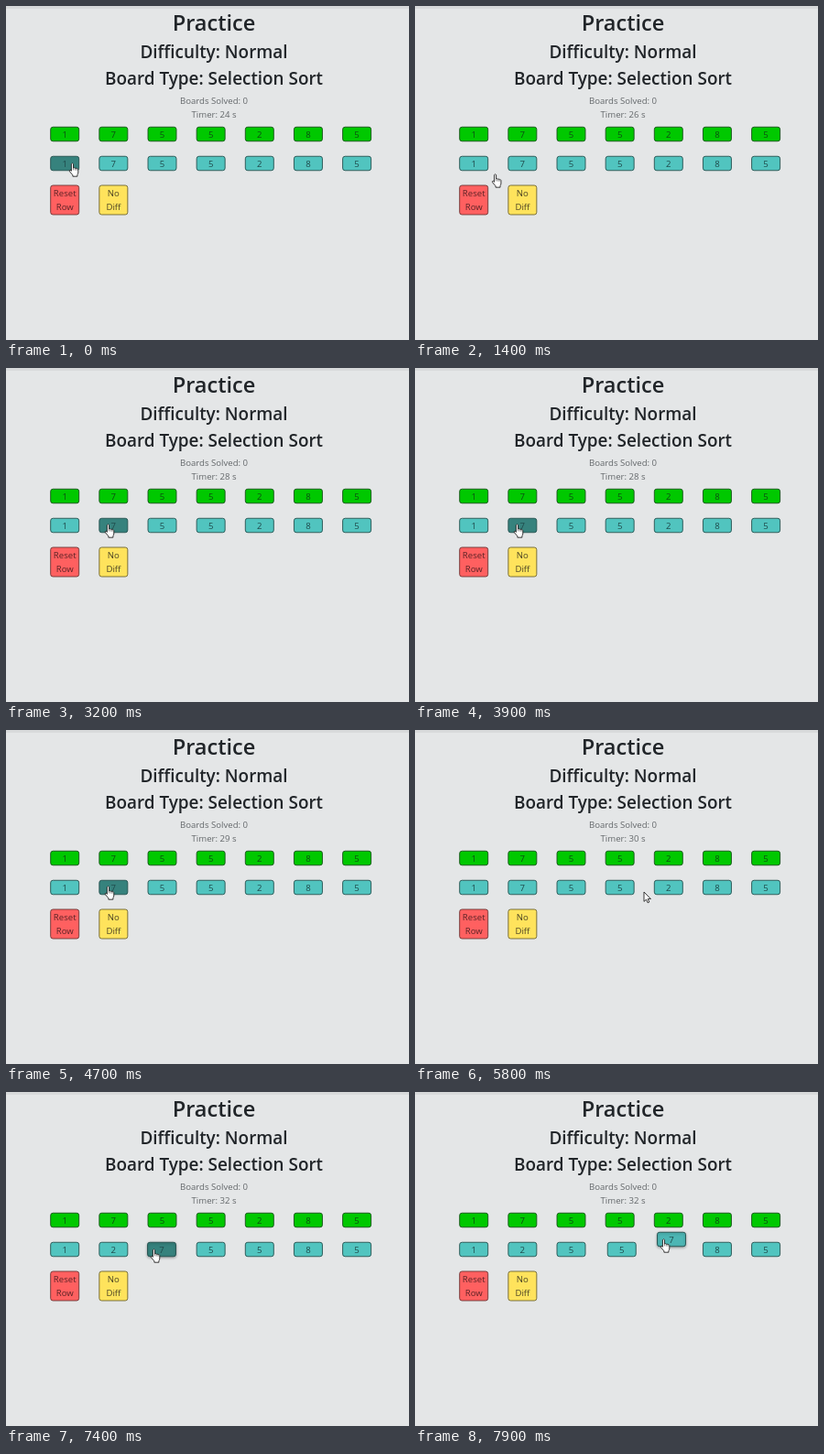
Recreate the animation shown at these times as an HTML page with a canvas. Size 440x365 px, loop 8000 ms.

```html
<!DOCTYPE html>
<html lang="en">
<head>
<meta charset="utf-8">
<title>Practice</title>
<style>
html, body { margin: 0; width: 100%; height: 100%; overflow: hidden; background: #e4e6e7; }
canvas { display: block; }
</style>
</head>
<body>
<canvas id="stage" width="440" height="365"></canvas>
<script>
const ctx = document.getElementById('stage').getContext('2d');
const LOOP = 8000, STEP = 100;
const TEAL = '#51c4bf', DARK = '#36827d';
const FONT = '"Open Sans", "Noto Sans", sans-serif';
const ROW_TOP = 140, ROW = 172;

const slot = i => 64.2 + i * 53.15;
const clamp = v => Math.max(0, Math.min(1, v));
const mix = (a, b, p) => a + (b - a) * p;
const smooth = p => p * p * (3 - 2 * p);
const easeOut = p => 1 - (1 - p) ** 3;
const ramp = (t, start, span) => easeOut(clamp((t - start) / span));

// [time, x, y] of the pointer's hot spot
const PATH = [
  [0, 72, 172], [1200, 72, 172], [1700, 115, 206], [2300, 115, 206],
  [2800, 111, 171], [5600, 111, 171], [5800, 250, 178], [6000, 268, 172],
  [6400, 268, 172], [6800, 134, 165], [6900, 109, 168], [7100, 108, 172],
  [7200, 161, 172], [7400, 161, 172], [7800, 271, 161], [8000, 271, 161]
];

function pointer(t) {
  const i = PATH.findIndex((p, n) => n && t < p[0]);
  const [t0, x0, y0] = PATH[i - 1], [t1, x1, y1] = PATH[i];
  const p = smooth((t - t0) / (t1 - t0));
  return { x: mix(x0, x1, p), y: mix(y0, y1, p) };
}

function text(str, x, y, size, color, weight = 400, spacing = 0) {
  ctx.font = `${weight} ${size}px ${FONT}`;
  ctx.letterSpacing = spacing + 'px';
  ctx.fillStyle = color;
  ctx.textAlign = 'center';
  ctx.fillText(str, x, y);
}

function box(x, y, h, fill, stroke) {
  ctx.beginPath();
  ctx.roundRect(x - 15.5, y - h / 2, 31, h, 2.6);
  ctx.fillStyle = fill;
  ctx.fill();
  ctx.strokeStyle = stroke;
  ctx.lineWidth = 0.9;
  ctx.stroke();
}

function cell(label, x, y, fill, lifted) {
  if (lifted) {
    ctx.shadowColor = 'rgba(0,0,0,.3)';
    ctx.shadowBlur = 3;
    ctx.shadowOffsetY = 1;
  }
  box(x, y, 15.5, fill, '#24514f');
  ctx.shadowColor = 'transparent';
  text(label, x, y + 3.5, 9.6, '#1f4a4b');
}

function button(x, lines, fill, stroke, ink) {
  box(x, 212, 32, fill, stroke);
  lines.forEach((s, i) => text(s, x, 208.3 + i * 14.9, 9.6, ink));
}

// Cells of the working row, left to right in their starting order
function cells(t, m) {
  const list = [1, 7, 5, 5, 2, 8, 5].map((label, i) =>
    ({ label, x: slot(i), y: ROW, fill: TEAL }));
  const [one, seven, fiveA, fiveB, two] = list;
  const shift = (c, to, start) => { c.x = mix(c.x, slot(to), ramp(t, start, 250)); };
  const grab = c => Object.assign(c, { x: m.x + 9, y: m.y, fill: DARK, lifted: true });

  shift(fiveB, 4, 6640);
  shift(fiveA, 3, 6717);
  shift(seven, 2, 6820);
  shift(fiveA, 2, 7520);
  shift(fiveB, 3, 7735);

  if (t < 1300) one.fill = DARK;
  if (t >= 2700 && t < 5700) seven.fill = DARK;
  if (t >= 5900) two.fill = DARK;
  if (t >= 6400) grab(two);
  if (t >= 7000) {
    Object.assign(two, { x: slot(1), y: ROW, lifted: false });
    if (t >= 7200) two.fill = TEAL;
  }
  if (t >= 7200) seven.fill = DARK;
  if (t >= 7400) grab(seven);
  if (t >= 7800) seven.fill = '#4db6b4';
  return list.sort((a, b) => !!a.lifted - !!b.lifted);
}

const HAND = new Path2D('M2.4 1.6Q3.5 .1 4.5 1.6V6Q5.4 5.1 6.3 6.3Q7.3 5.6 8 6.8Q9.3 6.2 9.8 7.6V11Q9.7 12.5 8.9 13.6V15.2H3.9V13.8L.5 9.8Q-.2 8.4 1.1 8.2L2.4 9.3Z');
const ARROW = new Path2D('M0 0V10.4L2.5 8.2L4.1 11.8L5.8 11L4.2 7.6H7.4Z');

function cursor(m, arrow) {
  ctx.save();
  ctx.translate(m.x - (arrow ? 0 : 3), m.y - 1);
  const shape = arrow ? ARROW : HAND;
  ctx.fillStyle = '#fff';
  ctx.strokeStyle = '#222';
  ctx.lineWidth = 0.9;
  ctx.fill(shape);
  ctx.stroke(shape);
  if (!arrow) {
    ctx.lineWidth = 0.5;
    ctx.stroke(new Path2D('M4.5 6V8.4M6.3 6.3V8.6M8 6.8V8.8'));
  }
  ctx.restore();
}

function draw(t) {
  ctx.fillStyle = '#e4e6e7';
  ctx.fillRect(0, 0, 440, 365);
  ctx.fillStyle = '#d8dadb';
  ctx.fillRect(0, 0, 440, 3);

  text('Practice', 227, 27, 23.6, '#212529', 600);
  text('Difficulty: Normal', 227, 57, 18.9, '#212529', 600);
  text('Board Type: Selection Sort', 227, 86, 18.9, '#212529', 600);
  text('Boards Solved: 0', 227, 107, 9.6, '#63676a');
  const seconds = 24 + Math.floor((t + 800) / 1000);
  text(`Timer: ${seconds} s`, 227, 122, 9.6, '#63676a');

  [1, 7, 5, 5, 2, 8, 5].forEach((n, i) => {
    box(slot(i), ROW_TOP, 15.5, '#00c800', '#17511a');
    text(n, slot(i), ROW_TOP + 3.5, 9.6, '#0c4d12');
  });

  const overDiff = t >= 1600 && t < 2600;
  button(slot(0), ['Reset', 'Row'], '#ff6060', '#6b3434', '#5c2326');
  button(slot(1), ['No', 'Diff'], overDiff ? '#a98f2b' : '#ffe35c', '#6b6230', '#4a4324');

  const m = pointer(t);
  cells(t, m).forEach(c => cell(c.label, c.x, c.y, c.fill, c.lifted));
  cursor(m, t >= 5700 && t < 5900);
}

const start = performance.now();
function frame() {
  const t = (performance.now() - start) % LOOP;
  draw(Math.floor(t / STEP) * STEP);
  requestAnimationFrame(frame);
}
frame();
</script>
</body>
</html>
```
